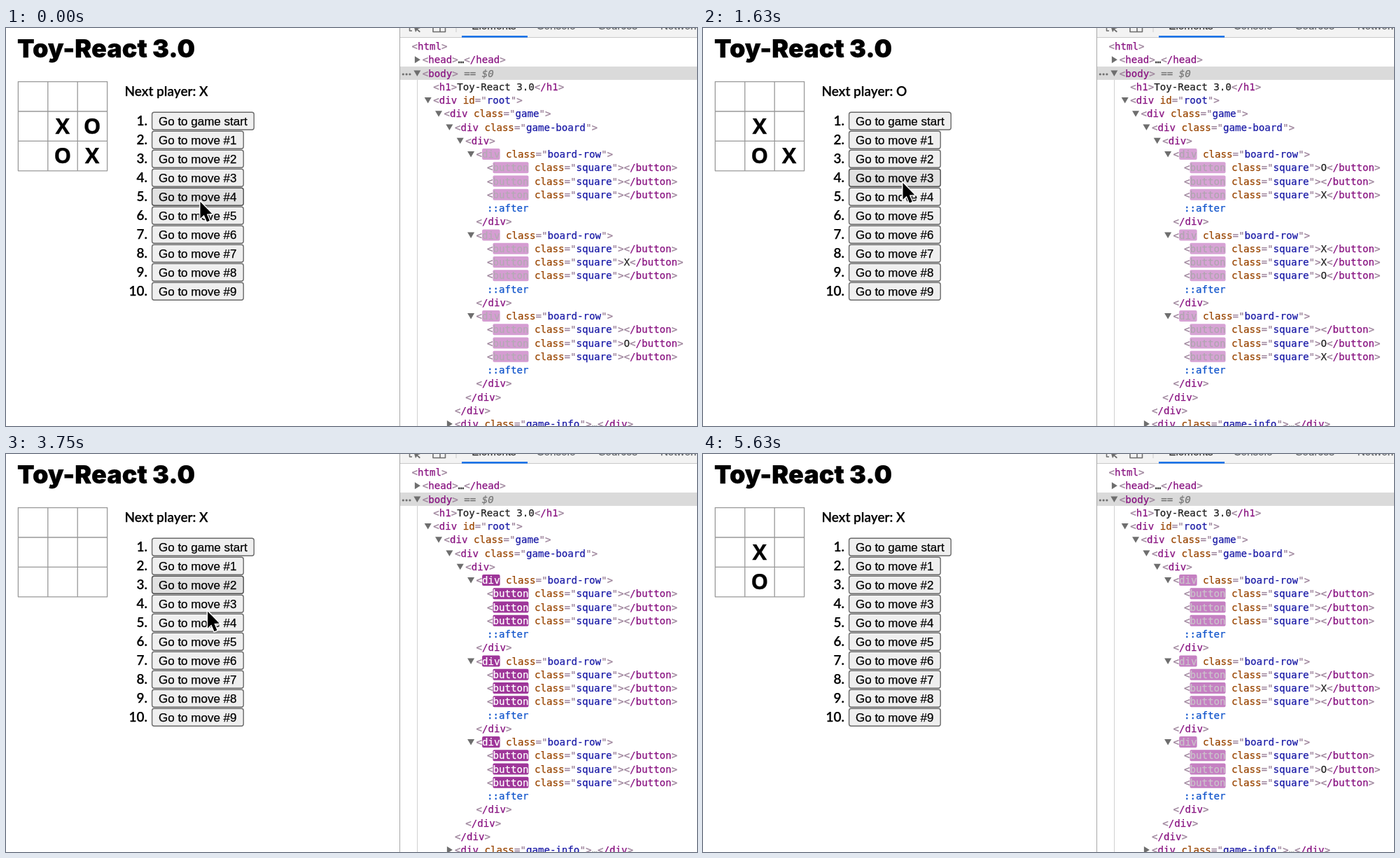
Write an HTML page with a canvas that moves like this. It is 987 by 568 pixels and loops after 5.76 s.

```html
<!DOCTYPE html>
<html lang="en">
<head>
<meta charset="utf-8">
<title>Tic-tac-toe time travel</title>
<style>
html, body { margin: 0; width: 100%; height: 100%; overflow: hidden; background: #fff; }
canvas { display: block; width: 987px; height: 568px; }
</style>
</head>
<body>
<canvas id="stage" width="987" height="568"></canvas>
<script>
const ctx = document.getElementById('stage').getContext('2d');
const LOOP = 5760, LAST_STEP = 45;
const TREE_LAG = 220, HOVER_LAG = 60, TRAVEL = 400;
const SANS = '"Liberation Sans", Arial, sans-serif';
const MONO = '14.12px "DejaVu Sans Mono", Menlo, monospace';
const LABEL = '600 19px Lato, Futura, sans-serif';
const CHAR = 8.5, ROW = 19.25, CELL = 42.4, BUTTON = 27;
const BRACKET = '#9c829a';
const INK = { bracket: BRACKET, name: '#881280', attr: '#994500', value: '#1a1aa6', text: '#222', pseudo: '#1155cc' };

// Squares in the order they were played, X first.
const MOVES = [4, 7, 8, 5, 2, 0, 3];

// Each click: its time, the move it jumps to, pointer x, and when the pointer leaves.
const CLICKS = [
  { at: -110, move: 4, x: 276, leave: 540 },
  { at: 840, move: 7, x: 274, leave: 1000 },
  { at: 1520, move: 3, x: 284, leave: 1895 },
  { at: 2380, move: 5, x: 285, leave: 2550 },
  { at: 3320, move: 0, x: 296, leave: 3470 },
  { at: 4130, move: 4, x: 284, leave: 4245 },
  { at: 5000, move: 2, x: 286, leave: 5120 }
];
const EXIT = { x: 372, y: -40 };

const clamp = k => Math.min(1, Math.max(0, k));
const smooth = k => k * k * (3 - 2 * k);

function latestClick(t) {
  const click = CLICKS.filter(c => c.at <= t).pop() || CLICKS[CLICKS.length - 1];
  return { move: click.move, age: (t - click.at + LOOP) % LOOP };
}

function boardAt(move) {
  const cells = Array(9).fill('');
  MOVES.slice(0, move).forEach((cell, i) => cells[cell] = 'XO'[i % 2]);
  return cells;
}

const tip = click => ({ x: click.x, y: 137.5 + click.move * BUTTON });

function pointerAt(t) {
  return CLICKS.reduce((from, click, i) => {
    const to = i + 1 < CLICKS.length ? tip(CLICKS[i + 1]) : EXIT;
    const k = smooth(clamp((t - click.leave) / TRAVEL));
    return { x: from.x + (to.x - from.x) * k, y: from.y + (to.y - from.y) * k };
  }, tip(CLICKS[0]));
}

// cubic-bezier(0, 0, 0.2, 1)
function ease(x) {
  let lo = 0, hi = 1;
  for (let i = 0; i < 20; i++) {
    const s = (lo + hi) / 2;
    if (0.6 * s * s + 0.4 * s * s * s < x) lo = s; else hi = s;
  }
  return smooth(lo);
}

const mix = (a, b, k) => `rgb(${a.map((v, i) => Math.round(v + (b[i] - v) * k))})`;

// Purple fades to pale pink for most of the flash, then to white.
function flashAt(age) {
  const p = age / 1400;
  const pale = [245, 219, 244], white = [255, 255, 255], grey = [136, 118, 136];
  if (p >= 1) return null;
  if (p < 0.8) {
    const k = ease(p / 0.8);
    return { back: mix([158, 54, 153], pale, k), ink: mix(white, grey, k) };
  }
  const k = ease((p - 0.8) / 0.2);
  return { back: mix(pale, white, k), ink: mix(grey, [136, 18, 128], k) };
}

// A hairline outline gives the slightly heavy smoothing of a desktop screen.
function text(str, x, y, font, color, align = 'left') {
  ctx.font = font;
  ctx.fillStyle = ctx.strokeStyle = color;
  ctx.textAlign = align;
  ctx.lineWidth = 0.25;
  ctx.lineJoin = 'round';
  ctx.fillText(str, x, y);
  ctx.strokeText(str, x, y);
}

function rect(x, y, w, h, color) {
  ctx.fillStyle = color;
  ctx.fillRect(x, y, w, h);
}

function trace(points) {
  ctx.beginPath();
  points.forEach(([x, y]) => ctx.lineTo(x, y));
}

function line(color, width, ...points) {
  trace(points);
  ctx.strokeStyle = color;
  ctx.lineWidth = width;
  ctx.stroke();
}

function polygon(color, ...points) {
  trace(points);
  ctx.closePath();
  ctx.fillStyle = color;
  ctx.fill();
}

function roundRect(x, y, w, h, r, color) {
  ctx.beginPath();
  ctx.roundRect(x, y, w, h, r);
  ctx.fillStyle = color;
  ctx.fill();
}

function drawBoard(cells) {
  for (let i = 0; i < 4; i++) {
    const p = i * CELL;
    line('#999', 1.3, [17.4 + p, 76], [17.4 + p, 204]);
    line('#999', 1.3, [17, 76.6 + p], [145, 76.6 + p]);
  }
  cells.forEach((mark, i) => {
    const x = 38.4 + (i % 3) * CELL, y = 108.5 + Math.floor(i / 3) * CELL;
    text(mark, x, y, 'bold 31px "Open Sans", "Noto Sans", sans-serif', '#000', 'center');
  });
}

function drawButtons(pointer) {
  for (let i = 0; i < 10; i++) {
    const y = 120.2 + i * BUTTON, w = i ? 130.6 : 145.6;
    const over = pointer.y >= y - 1 && pointer.y < y + 26;
    text(`${i + 1}.`, 202, y + 18.8, LABEL, '#000', 'right');
    roundRect(208.6, y, w, 25, 3, over ? '#e1e1e1' : '#efefef');
    ctx.strokeStyle = over ? '#4c4c4c' : '#6a6a6a';
    ctx.lineWidth = 1.4;
    ctx.stroke();
    text(i ? `Go to move #${i}` : 'Go to game start', 218, y + 18.4, `17px ${SANS}`, '#000');
  }
}

function drawPointer({ x, y }) {
  ctx.save();
  ctx.translate(x + 1.5, y + 2.5);
  ctx.scale(0.95, 0.95);
  ctx.lineJoin = 'miter';
  trace([[0, 0], [0, 25], [5.6, 19.8], [10, 30], [14, 28.3], [9.8, 18.3], [17.5, 18]]);
  ctx.closePath();
  ctx.strokeStyle = '#fff';
  ctx.lineWidth = 3;
  ctx.stroke();
  ctx.fillStyle = '#000';
  ctx.fill();
  ctx.restore();
}

function drawToolbar() {
  const grey = '#6e6e6e';
  rect(563, 0, 424, 13, '#f3f3f3');
  rect(563, 13, 424, 1, '#cacaca');
  rect(651, 11, 94, 2.6, '#1a73e8');
  rect(642.5, 0, 1, 6, '#ccc');
  line(grey, 1.5, [576.5, 0], [576.5, 4], [580, 4]);
  polygon(grey, [582, -4], [592, 0], [588, 1.5], [592, 5], [590.5, 6.3], [587, 3], [585, 6]);
  line(grey, 1.6, [610, 0], [610, 5.5], [627.5, 5.5], [627.5, 0]);
  line(grey, 1.6, [620, 0], [620, 5.5]);
  ['Elements', 'Console', 'Sources', 'Network'].forEach((label, i) =>
    text(label, 697 + i * 88.5, 2, `15.2px ${SANS}`, i ? '#5f6368' : '#333', 'center'));
}

function arrow(x, y, open) {
  if (open) polygon('#6e6e6e', [x - 5, y - 4], [x + 5, y - 4], [x, y + 4.5]);
  else polygon('#6e6e6e', [x - 3.5, y - 5], [x + 4.5, y], [x - 3.5, y + 5]);
}

function drawTree(cells, flash) {
  let row = 0;

  // Writes one line of [text, ink, flashes] pieces.
  function write(depth, pieces, fold) {
    const y = 26 + row++ * ROW;
    let x = 579.5 + depth * 15.35;
    if (fold) arrow(x - 7.5, y, fold === 'open');
    pieces.forEach(([str, ink, flashes]) => {
      const w = str.length * CHAR;
      const lit = flashes && flash;
      if (lit) roundRect(x, y - 8, w, 16, 2, flash.back);
      text(str, x, y + 5, MONO, lit ? flash.ink : INK[ink]);
      x += w;
    });
    return { x, y };
  }

  const open = (name, attr, value, flashes) => [
    ['<', 'bracket'], [name, 'name', flashes],
    ...(attr ? [[' ' + attr, 'attr'], ['="', 'bracket'], [value, 'value'], ['"', 'bracket']] : []),
    ['>', 'bracket']
  ];
  const close = name => [['<', 'bracket'], ['/' + name, 'name'], ['>', 'bracket']];

  rect(563, 55, 424, 19, '#dadada');
  rect(587, 74, 1, 494, '#d0d0d0');
  write(0, open('html'));
  write(1, [...open('head'), ['…', 'text'], ...close('head')], 'shut');
  const end = write(1, open('body'), 'open');
  text(' == $0', end.x, end.y + 5, 'italic ' + MONO, '#777');
  for (let i = 0; i < 3; i++) roundRect(565.7 + i * 4.8, 64.4, 3.2, 3.2, 1.6, '#6e6e6e');
  write(2, [...open('h1'), ['Toy-React 3.0', 'text'], ...close('h1')]);
  write(2, open('div', 'id', 'root'), 'open');
  write(3, open('div', 'class', 'game'), 'open');
  write(4, open('div', 'class', 'game-board'), 'open');
  write(5, open('div'), 'open');
  for (let r = 0; r < 3; r++) {
    write(6, open('div', 'class', 'board-row', true), 'open');
    for (let c = 0; c < 3; c++) {
      write(7, [...open('button', 'class', 'square', true), [cells[r * 3 + c], 'text'], ...close('button')]);
    }
    write(7, [['::after', 'pseudo']]);
    write(6, close('div'));
  }
  write(5, close('div'));
  write(4, close('div'));
  write(4, [...open('div', 'class', 'game-info'), ['…', 'text'], ...close('div')], 'shut');
}

function draw(now) {
  // Eight pictures a second, each starting on a whole hundredth.
  const step = Math.min(LAST_STEP, Math.floor(Math.floor(now % LOOP / 10) / 12.5));
  const t = Math.ceil(step * 12.5) * 10;
  const { move } = latestClick(t);
  const tree = latestClick(t - TREE_LAG);

  rect(0, 0, 987, 568, '#fff');
  text('Toy-React 3.0', 16, 42, '900 36px Inter, Futura, sans-serif', '#000');
  text(`Next player: ${'XO'[move % 2]}`, 169.5, 96.5, LABEL, '#000');
  drawBoard(boardAt(move));
  drawButtons(pointerAt(t - HOVER_LAG));
  drawPointer(pointerAt(t));

  rect(562, 0, 1, 568, '#a8a8a8');
  drawToolbar();
  drawTree(boardAt(tree.move), flashAt(tree.age - TREE_LAG));
}

function tick() {
  draw(performance.now());
  requestAnimationFrame(tick);
}
tick();
</script>
</body>
</html>
```
